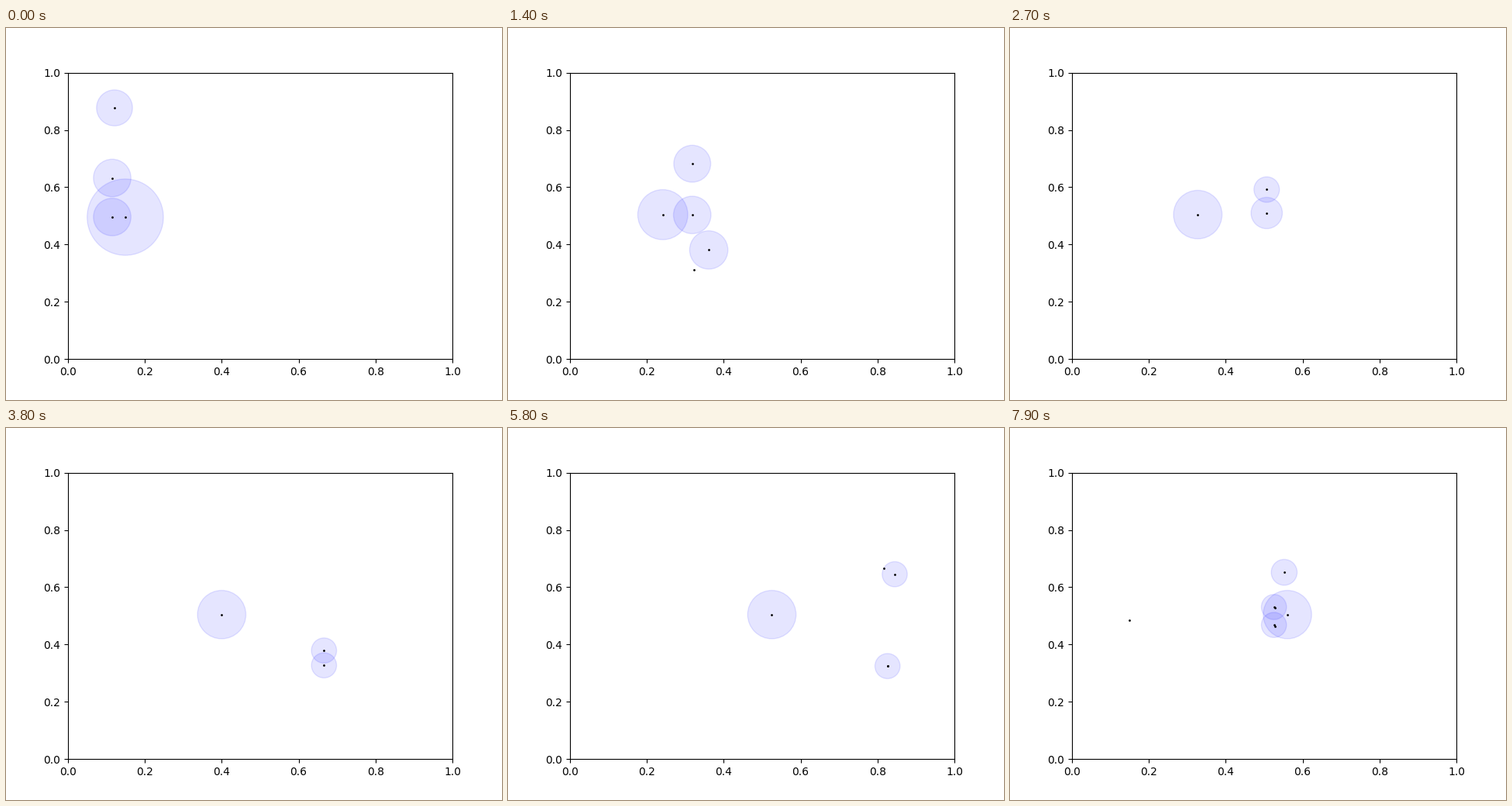
These frames come from a looping animation (640x480 px, 8 s). A matplotlib script:

```python
import numpy as np
import matplotlib.pyplot as plt
from matplotlib.animation import FuncAnimation

FRAMES, STEP = 80, 100
START, SPEED, TURN = 0.115, 0.0145, 53.65


def target(t, side):
    """Two targets run right on mirrored sine paths, then come back."""
    x = START + SPEED * (TURN - abs(t - TURN))
    return x, 0.5 + side * 0.2 * np.sin(2 * np.pi * x)


def overshoot(t):
    """Swing of an estimate around its target after the turn."""
    return np.sin(np.pi * np.clip((t - 54) / 25, 0, 1))


def settle(t, mid):
    """Halo radius: wide while uncertain, then narrow."""
    return 16.5 + 8 / (1 + np.exp((t - mid) / 2))


def slow_track(t):
    u = max(t - 54, 0)
    x = 0.149 + 0.0066 * t - 0.00115 * u - 0.00013 * u * u
    return x, 0.5045 - 0.009 * np.exp(-t / 4), 31.5 + 18 * np.exp(-t / 5)


def upper_track(t):
    x, y = target(t, 1)
    late = 0.1 * np.exp(-((t - 27) / 4) ** 2)
    return x - 0.008 * overshoot(t), y + late, settle(t, 20)


def lower_track(t):
    x, _ = target(t, -1)
    y = np.interp(t, [0, 27, 38, 49, 68, 79],
                  [0.496, 0.51, 0.379, 0.58, 0.718, 0.531])
    return x + 0.031 * overshoot(t), y, settle(t, 27)


def first_track(t):
    return 0.121 + SPEED * t, 0.877 - 0.01 * t, 23.5


def early_track(t):
    x, y = target(t, -1)
    return x + 0.043, y + 0.063, 25


def late_track(t):
    u = (t - 68) / 11
    return 0.595 - 0.043 * u, 0.73 - 0.078 * u, 17 + 21.5 * (1 - u)


# track, first and last frame alive
TRACKS = [(slow_track, 0, 79), (upper_track, 0, 79), (lower_track, 0, 79),
          (first_track, 0, 2), (early_track, 8, 19), (late_track, 66, 79)]


def detections(t):
    """Noisy sightings of the targets, plus clutter outside the calm spell."""
    rng = np.random.default_rng(t)
    sides = (1, -1) if t > 49 else (-1,) if 3 < t < 20 else ()
    seen = [target(t, s) + rng.normal(0, 0.006, 2) for s in sides]
    if not 26 < t < 39 and rng.random() < 0.35:
        seen.append(rng.uniform(0.03, 0.98, 2))
    return seen


fig, ax = plt.subplots(figsize=(6.4, 4.8), dpi=100)
ax.set_xlim(0, 1)
ax.set_ylim(0, 1)
halos = ax.scatter([], [], s=[], c="blue", alpha=0.1)
dots = ax.scatter([], [], s=1, c="black")


def draw(t):
    rows = [track(t) for track, first, last in TRACKS if first <= t <= last]
    centres = [(x, y) for x, y, _ in rows]
    halos.set_offsets(centres)
    halos.set_sizes([(2 * (r - 0.3) * 0.72) ** 2 for _, _, r in rows])
    dots.set_offsets(np.array(centres + detections(t)))
    return halos, dots


anim = FuncAnimation(fig, draw, frames=FRAMES, interval=STEP,
                     repeat=True, repeat_delay=0, blit=False)
plt.show()
```
